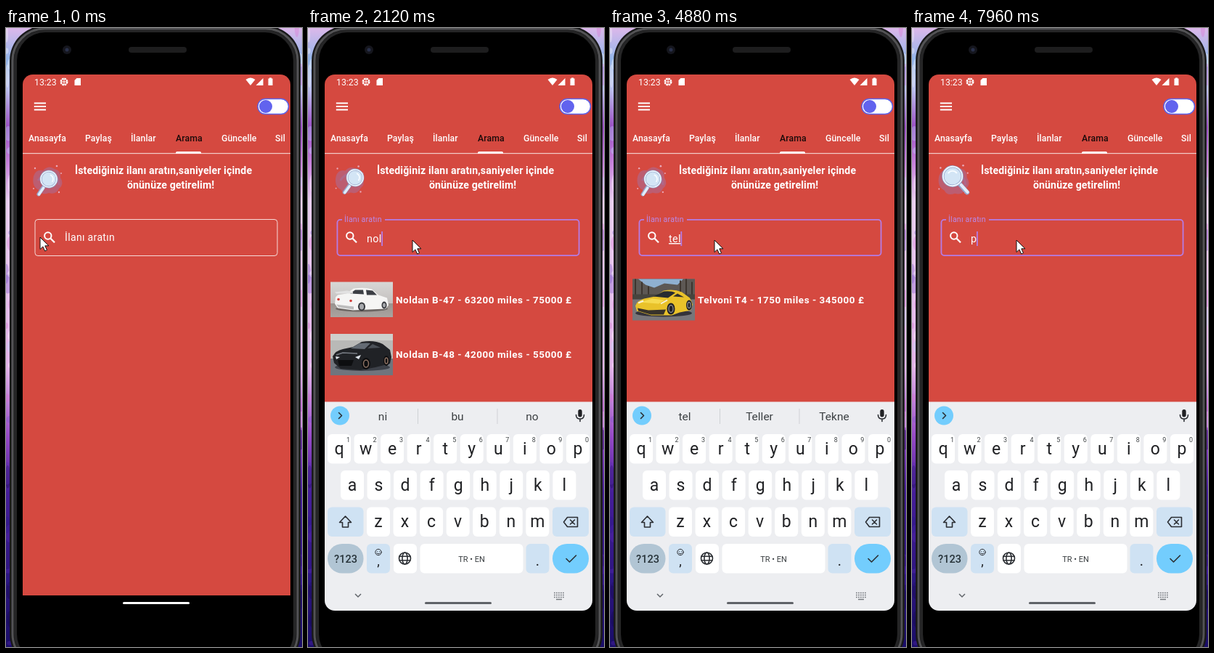
An HTML page that plays this animation: 408x852 px, repeating every 8 s.

```html
<!DOCTYPE html>
<html lang="tr">
<head>
<meta charset="utf-8">
<title>Arama</title>
<style>
html, body { margin: 0; width: 100%; height: 100%; overflow: hidden; background: #000; }
svg { display: block; width: 408px; height: 852px; font-family: Roboto, sans-serif; }
.tab { font-size: 12.25px; font-weight: 500; letter-spacing: .09px; fill: #fff; }
.title { font-size: 14.1px; font-weight: 700; letter-spacing: .12px; fill: #fff; }
.row { font-size: 13.5px; font-weight: 700; letter-spacing: .5px; fill: #fff; }
.key { font-size: 23px; fill: #202124; text-anchor: middle; }
.digit { font-size: 9px; fill: #3c4043; text-anchor: middle; }
.word { font-size: 15.5px; fill: #3c4043; text-anchor: middle; }
.line { fill: none; stroke: #2b2e33; stroke-width: 1.6; stroke-linecap: round; stroke-linejoin: round; }
</style>
</head>
<body>
<svg viewBox="0 0 408 852">
  <defs>
    <linearGradient id="paint" x2="0" y2="1">
      <stop offset="0" stop-color="#dcb8ea"/><stop offset=".05" stop-color="#94b6ea"/>
      <stop offset=".1" stop-color="#bcc0ee"/><stop offset=".16" stop-color="#9a50c4"/>
      <stop offset=".22" stop-color="#c884dc"/><stop offset=".28" stop-color="#ead0f0"/>
      <stop offset=".55" stop-color="#e3b4e9"/><stop offset=".66" stop-color="#964ac6"/>
      <stop offset=".75" stop-color="#451e9a"/><stop offset="1" stop-color="#190d68"/>
    </linearGradient>
    <linearGradient id="studio" x2="0" y2="1">
      <stop offset="0" stop-color="#d8d7d6"/><stop offset=".6" stop-color="#c3c0be"/>
      <stop offset=".62" stop-color="#99938f"/><stop offset="1" stop-color="#aaa4a0"/>
    </linearGradient>
    <clipPath id="screen"><rect x="23" y="64" width="369" height="738" rx="14"/></clipPath>
    <clipPath id="box"><rect x="40" y="263" width="335" height="51" rx="4"/></clipPath>
  </defs>

  <rect width="408" height="852" fill="url(#paint)"/>
  <g id="strokes"></g>
  <rect x="5" y="-3" width="401" height="885" rx="48" fill="#19191a"/>
  <rect x="9" y="1" width="393" height="877" rx="44" fill="none" stroke="#535355" stroke-width="3"/>
  <rect x="11" y="3" width="389" height="873" rx="42" fill="#252526"/>
  <rect x="15" y="6" width="381" height="867" rx="39" fill="#000"/>
  <circle cx="84" cy="30" r="6" fill="#15161d"/><circle cx="84" cy="30" r="2.5" fill="#29304a"/>
  <rect x="169" y="26" width="80" height="8" rx="4" fill="#1d1d1e"/>

  <g clip-path="url(#screen)">
    <rect x="23" y="64" width="369" height="717" fill="#d54940"/>
    <g fill="#fff">
      <text x="39" y="78.5" font-size="12.3">13:23</text>
      <circle cx="80" cy="74" r="4.6" fill="none" stroke="#fff" stroke-width="1.8" stroke-dasharray="2.6 1"/>
      <circle cx="80" cy="74" r="3.8" fill="none" stroke="#fff"/>
      <path d="M80 70v8M76 74h8" stroke="#fff"/>
      <path d="M97.5 69h5.5v10h-8.500v-7z"/>
      <path d="M330.500 71q6.500-5 13 0l-6.500 8z"/>
      <path d="M354.500 69v10h-10z"/>
      <path d="M363 68.500h3v1h1.500v9.500h-6v-9.500h1.500z"/>
      <path d="M38.800 102.600h16.200v1.800h-16.200zM38.800 107.100h16.200v1.800h-16.200zM38.800 111.600h16.200v1.800h-16.200z"/>
    </g>
    <rect x="347" y="97.500" width="42.500" height="21" rx="10.500" fill="#fff" stroke="#5e62e8" stroke-width="1.500"/>
    <circle cx="358" cy="108" r="9" fill="#6163ee"/>
    <g id="tabs"></g>
    <rect x="23" y="172" width="369" height="1.200" fill="#f3cbc8"/>
    <path d="M234 173v-1q0-2 2-2h31q2 0 2 2v1z" fill="#fff"/>
    <text class="title" x="95" y="201">İstediğiniz ilanı aratın,saniyeler içinde</text>
    <text class="title" x="167" y="220.500">önünüze getirelim!</text>

    <g id="blob">
      <path d="M38 204q3-10 13-8q8-8 16-2q9 2 8 12q6 9-2 15q-4 9-14 6q-10 4-14-4q-10-5-7-19z" fill="#b0688a" opacity=".66"/>
      <path d="M44 210q8-12 18-9q11 4 11 15" fill="none" stroke="#9a78b0" stroke-width="3" opacity=".4"/>
      <g fill="#e9a9b9"><circle cx="40" cy="193" r="1.200"/><circle cx="70" cy="190" r="1.300"/><circle cx="76" cy="200" r="1"/><circle cx="38" cy="221" r="1"/><circle cx="73" cy="226" r="1.200"/></g>
    </g>
    <g id="lens">
      <path d="M12 0H25" stroke="#97a9cd" stroke-width="5.200" stroke-linecap="round"/>
      <path d="M14 -.600H25" stroke="#e2edfb" stroke-width="3.400" stroke-linecap="round"/>
      <circle r="11" fill="#d3e5f5" stroke="#8fa4cb" stroke-width="2.800"/>
      <circle r="11" fill="none" stroke="#edf4fc" stroke-width="1.600"/>
      <path d="M-6 1A6 6 0 0 1 0-6" fill="none" stroke="#f6fbff" stroke-width="1.800" stroke-linecap="round"/>
    </g>

    <g clip-path="url(#box)"><circle id="ripple" cx="144" cy="293" fill="#a8322d"/></g>
    <rect id="border" rx="4" fill="none"/>
    <rect id="gap" x="47" y="260" width="59" height="7" fill="#d54940"/>
    <text id="label">İlanı aratın</text>
    <g fill="none" stroke="#fff" stroke-width="2"><circle cx="57.800" cy="286" r="4.700"/><path d="M61.300 289.500L67 295.300" stroke-width="2.300"/></g>
    <text id="typed" x="81" y="295" font-size="14.300" letter-spacing=".35" fill="#fff"></text>
    <rect id="caret" y="280" width="1.800" height="20" fill="#b47ce6"/>

    <g id="studioCars">
      <g transform="translate(31 349.500)">
        <rect width="86" height="48.500" fill="url(#studio)"/>
        <ellipse cx="43" cy="37" rx="36" ry="4" fill="#6c6663"/>
        <path d="M7 21l3-3 12-2 10-7q16-2 25 1l9 8 12 4 2 10-4 5-45 2-21-3-4-6z" fill="#f5f5f4"/>
        <path d="M27 16l7-5h11l1 6zM49 11l9 1 6 6-14 0z" fill="#3b3e44"/>
        <path d="M6 14l17-2 8 2v2H8z" fill="#e2e2e2"/>
        <path d="M8 31l24 3v4l-21-3z" fill="#bdbdbd"/>
        <g fill="#d2423c"><circle cx="11" cy="24" r="1.800"/><circle cx="28" cy="26" r="1.800"/></g>
        <g fill="#36383c"><ellipse cx="43" cy="34" rx="5" ry="6"/><ellipse cx="74" cy="32" rx="3.500" ry="5"/></g>
        <g fill="#a7a9ad"><ellipse cx="43" cy="34" rx="3" ry="4"/><ellipse cx="74" cy="32" rx="2" ry="3"/></g>
      </g>
      <g transform="translate(31 421)">
        <rect width="86" height="57" fill="#b9b9b7"/>
        <rect y="34" width="86" height="23" fill="#70757d"/>
        <path d="M0 0h86v9H0z" fill="#cfcfcc"/>
        <ellipse cx="44" cy="46" rx="38" ry="5" fill="#3d4149"/>
        <path d="M3 31q4-8 14-10l14-3 12-7q17-3 29 3l10 8 2 10-2 9-20 5-21 4-27-2-9-8z" fill="#202226"/>
        <path d="M28 20l12-7q11-1 15 0l-8 8z" fill="#646b74"/><path d="M51 20l7-6 11 5z" fill="#4b5057"/>
        <path d="M8 29l9-3 20 1" fill="none" stroke="#777c84" stroke-width="1.500"/>
        <path d="M10 36h22l-3 8H12z" fill="#0d0e10"/>
        <path d="M7 31l6 1-5 3zM34 32l8-3-3 6z" fill="#dde3ea"/>
        <g fill="#0c0d0f"><ellipse cx="49" cy="41" rx="6" ry="8"/><ellipse cx="77" cy="37" rx="4" ry="7"/></g>
        <g fill="none" stroke="#8d7263" stroke-width="1.500"><ellipse cx="49" cy="41" rx="3.500" ry="5"/><ellipse cx="77" cy="37" rx="2" ry="4"/></g>
      </g>
      <text class="row" x="121" y="378.500">Noldan B-47 - 63200 miles - 75000 £</text>
      <text class="row" x="121" y="453.500">Noldan B-48 - 42000 miles - 55000 £</text>
    </g>
    <g id="roadCar">
      <g transform="translate(31 345.500)">
        <rect width="86" height="57" fill="#77767a"/>
        <path d="M0 0h86v24H0z" fill="#5d5854"/>
        <path d="M8 0h62l-8 8-18-2-14 6-12-4z" fill="#8fb0d0"/>
        <path d="M4 0v25M13 4v20M22 10v14M66 2v22M74 0v24M82 4v22" stroke="#3d352f" stroke-width="2"/>
        <path d="M0 21h86v7H0z" fill="#46443e"/>
        <ellipse cx="43" cy="47" rx="39" ry="5" fill="#34333a"/>
        <path d="M4 37q2-7 12-10l15-3 12-8q14-3 25 2l11 8 4 9-3 8-15 3-11 4-28 0-20-6z" fill="#e9c22a"/>
        <path d="M29 24l14-7q11-1 16 2l-10 7z" fill="#272b31"/><path d="M56 24l6-4 9 5z" fill="#31302c"/>
        <path d="M10 32l17-5 17 2-8 5z" fill="#f6da50"/>
        <path d="M7 40l15 3 24-1-3 7H25l-17-5z" fill="#37322a"/>
        <path d="M8 33l7-3M39 34l9-5" stroke="#f6f2dc" stroke-width="2"/>
        <g fill="#202126"><ellipse cx="53" cy="41" rx="5.500" ry="8"/><ellipse cx="78" cy="36" rx="4" ry="7"/></g>
        <g fill="none" stroke="#888a90" stroke-width="1.300"><ellipse cx="53" cy="41" rx="3" ry="5"/><ellipse cx="78" cy="36" rx="2" ry="4"/></g>
      </g>
      <text class="row" x="121" y="378.500">Telvoni T4 - 1750 miles - 345000 £</text>
    </g>

    <rect x="23" y="781" width="369" height="21" fill="#000"/>
    <g id="keyboard">
      <rect x="23" y="514.500" width="369" height="300" fill="#edeef1"/>
      <circle cx="44" cy="533.500" r="13" fill="#73cdfd"/>
      <path id="arrow" class="line"/>
      <g id="toolbar" class="line">
        <path d="M87.500 527h13v9l-4.500 4.500h-8.500zM96 540.500v-4.500h4.500M91 531v.500M97 531v.500M91 535q3 2.500 6 0"/>
        <text x="148" y="538.500" font-size="12" font-weight="900" fill="#2b2e33" stroke="none" text-anchor="middle" letter-spacing=".4">GIF</text>
        <path d="M195.500 528h11.500v13h-11.500zM199 528v-2h4.500v2M198.500 532.500h5.500M198.500 535.500h5.500M198.500 538.200h3.500"/>
        <circle cx="255" cy="534" r="4.500" stroke-width="3.800"/>
        <circle cx="255" cy="534" r="6.700" stroke-width="2.400" stroke-dasharray="2.800 4.217" stroke-linecap="butt"/>
        <path d="M287.500 524v20" stroke="#d3d5d9" stroke-width="1"/>
        <path d="M315 534h.1M320 534h.1M325 534h.1" stroke-width="2.800"/>
      </g>
      <g id="words">
        <path d="M151.500 524v21M261 524v21" stroke="#cfd1d5"/>
        <text class="word" x="103" y="540"></text><text class="word" x="206" y="540"></text><text class="word" x="309" y="540"></text>
      </g>
      <rect x="372.300" y="525" width="5.400" height="10.500" rx="2.700" fill="#202124"/>
      <path class="line" d="M369.500 532.500q0 5.500 5.500 5.500t5.500-5.500M375 538v3.500"/>
      <g id="keys"></g>
      <path class="line" d="M51.500 672l-8 8.500h4v6.500h8v-6.500h4z"/>
      <path class="line" d="M357.500 673.500h14v13h-14l-5-6.500zM361.500 677l6 6M367.500 677l-6 6"/>
      <text x="52" y="735.500" font-size="14.500" font-weight="500" fill="#263238" text-anchor="middle">?123</text>
      <g class="line">
        <circle cx="97" cy="721.500" r="4.200" stroke-width="1"/><path d="M95.400 720.500v.1M98.600 720.500v.1M94.800 723q2.200 2 4.400 0" stroke-width="1"/>
        <circle cx="133.500" cy="730" r="8"/><ellipse cx="133.500" cy="730" rx="3.600" ry="8"/><path d="M126 727.300h15M126 732.700h15"/>
        <path d="M356 730.500l4.500 4.500 9-9"/>
      </g>
      <text class="key" x="97" y="740" style="font-size:18px">,</text>
      <text class="key" x="316.500" y="740" style="font-size:20px">.</text>
      <text x="225.500" y="734.500" font-size="11" fill="#3c4043" text-anchor="middle">TR • EN</text>
    </g>
    <g id="nav">
      <path d="M65 779l4 4 4-4" fill="none" stroke="#62666b" stroke-width="1.500"/>
      <path d="M339 777.500h14M339 780.500h14M339 783.500h14" stroke="#777b80" stroke-width="1.700" stroke-dasharray="1.800 1.200"/>
      <path d="M342 786.500h8" stroke="#777b80" stroke-width="1.300"/>
    </g>
    <rect id="home" x="161" y="790" width="92" height="3" rx="1.500"/>
  </g>
  <path id="mouse" d="M0 0v16.500l3.900-3.600 2.700 6.100 2.900-1.300-2.700-5.900h5.200z" fill="#fff" stroke="#111" stroke-width="1" stroke-linejoin="round"/>
</svg>
<script>
const LOOP = 8000, FOCUS = 960, RISE = 1000;
const $ = id => document.getElementById(id);
const set = (el, attrs) => { for (const k in attrs) el.setAttribute(k, attrs[k]); };
const add = (parent, tag, attrs, text) => {
  const el = document.createElementNS('http://www.w3.org/2000/svg', tag);
  set(el, attrs);
  if (text) el.textContent = text;
  parent.append(el);
};
const clamp = v => Math.max(0, Math.min(1, v));
const mix = (a, b, p) => a + (b - a) * p;
const smooth = p => p * p * (3 - 2 * p);
const show = (el, on) => { el.style.display = on ? '' : 'none'; };

// Painted wallpaper behind the phone
let seed = 7;
const random = () => (seed = seed * 16807 % 2147483647) / 2147483647;
for (let i = 0; i < 70; i++) {
  const y = random() * 852, left = random() < .6;
  const tints = y < 560 ? ['#fff', '#b9d8f5', '#d86fd0', '#7b55c8'] : ['#5b2cb4', '#2a1a8c', '#120a48'];
  add($('strokes'), 'ellipse', {
    cx: left ? random() * 12 : 398 + random() * 10, cy: y, rx: 2 + random() * 5, ry: 3 + random() * 13,
    fill: tints[Math.floor(random() * tints.length)], opacity: .35
  });
}

[['Anasayfa', 31], ['Paylaş', 109], ['İlanlar', 172], ['Arama', 234], ['Güncelle', 297], ['Sil', 371]]
  .forEach(([name, x]) => add($('tabs'), 'text',
    { class: 'tab', x, y: 156, style: name === 'Arama' ? 'fill:#1c0b0a' : '' }, name));

const key = (x, y, width, fill = '#fff', rx = 6) =>
  add($('keys'), 'rect', { x, y, width, height: 40.5, rx, fill });
[['qwertyuiop', 27, 559], ['asdfghjkl', 45, 609], ['zxcvbnm', 81, 659.5]].forEach(([letters, left, y], row) =>
  [...letters].forEach((letter, i) => {
    const x = left + i * 36.55;
    key(x, y, 32);
    add($('keys'), 'text', { class: 'key', x: x + 16, y: y + 27.5 }, letter);
    if (!row) add($('keys'), 'text', { class: 'digit', x: x + 28.5, y: y + 11 }, String((i + 1) % 10));
  }));
key(27, 659.5, 49.5, '#cfe2f3');
key(337, 659.5, 50, '#cfe2f3');
key(27, 710, 49.5, '#b1c5d4', 20);
key(81, 710, 32, '#cfe2f3');
key(118, 710, 32);
key(154.5, 710, 142);
key(300.5, 710, 32, '#cfe2f3');
key(337, 710, 50, '#73cdfd', 20);

const edits = [
  [FOCUS, ''], [1680, 'n'], [1840, 'no'], [2040, 'nol'],
  [3560, 'no'], [3720, 'n'], [3880, ''],
  [4280, 't'], [4480, 'te'], [4720, 'tel'], [5080, 'telv'],
  [6160, 'tel'], [6320, 'te'], [6480, 't'], [6640, ''], [7880, 'p']
];
const suggestions = {
  n: ['ne', 'bu', 'no'], no: ['ni', 'bu', 'no'], nol: ['nol', 'Nohut', 'nor'],
  t: ['te', 've', 'bu'], te: ['te', 'tek', 'ten'],
  tel: ['tel', 'Teller', 'Tekne'], telv: ['telv', 'Telvoni', 'Telefon']
};
const editAt = t => edits.filter(e => e[0] <= t).pop() || edits[0];

// time, x, y, handle angle, scale
const swing = [
  [0, 59, 208, 124, 1], [600, 63, 211, 126, 1], [1220, 60.5, 216, 128, 1],
  [2120, 65, 206, 126, 1], [3000, 56, 204, 48, 1.2], [3640, 57, 204, 49, 1.25], [4960, 59, 208, 124, 1]
];
function drawLens(t) {
  t %= 4960;
  const i = swing.findIndex(s => s[0] > t), a = swing[i - 1], b = swing[i];
  const p = smooth((t - a[0]) / (b[0] - a[0]));
  const [, x, y, angle, scale] = a.map((v, k) => mix(v, b[k], p));
  set($('lens'), { transform: `translate(${x} ${y}) rotate(${angle}) scale(${scale})` });
  const pulse = 1 + .04 * Math.sin(t / 4960 * Math.PI * 4);
  set($('blob'), { transform: `translate(57 209) scale(${pulse}) translate(-57 -209)` });
}

function drawField(t) {
  const focused = t >= FOCUS, p = smooth(clamp((t - FOCUS) / 167));
  const [since, text] = editAt(t);
  const weight = focused ? 1.8 : 1;
  set($('border'), {
    x: 40 + weight / 2 - .5, y: 263 + weight / 2, width: 335 - weight, height: 51 - weight,
    stroke: focused ? '#b47ce6' : '#f6dbd9', 'stroke-width': weight
  });
  show($('gap'), p > .5);
  set($('label'), {
    x: mix(81, 50, p), y: mix(293, 267, p), 'font-size': mix(14, 10.5, p),
    'letter-spacing': mix(.35, .25, p), fill: focused ? '#b98aec' : '#fff'
  });
  const typed = $('typed');
  typed.textContent = text;
  typed.style.textDecoration = text[0] === 't' ? 'underline' : 'none';
  set($('caret'), { x: 80.6 + (text ? typed.getComputedTextLength() : 0) });
  show($('caret'), focused && (t - since) % 1000 < 500);
  set($('ripple'), { r: mix(8, 70, clamp((t - 900) / 300)), opacity: t < 900 ? 0 : .22 * clamp((1210 - t) / 250) });
  show($('studioCars'), text[0] === 'n');
  show($('roadCar'), text[0] === 't');
}

function drawKeyboard(t) {
  const left = 1 - clamp((t - RISE) / 240), shown = t >= RISE;
  const text = editAt(t)[1], words = suggestions[editAt(t - 120)[1]];
  set($('keyboard'), { transform: `translate(0 ${287 * left * left})` });
  show($('keyboard'), shown);
  show($('nav'), shown && left < .15);
  set($('home'), { fill: !shown ? '#fff' : left < .15 ? '#606368' : '#dcdde1' });
  show($('toolbar'), !text);
  set($('arrow'), { d: text ? 'M42.500 529.500l4 4-4 4' : 'M45.500 529.500l-4 4 4 4' });
  show($('words'), text && words);
  if (words) $('words').querySelectorAll('text').forEach((el, i) => { el.textContent = words[i]; });
}

function draw(t) {
  const p = smooth(clamp((t - 200) / 560));
  set($('mouse'), { transform: `translate(${mix(47, 144, p)} ${mix(288, 292, p)})` });
  drawLens(t);
  drawField(t);
  drawKeyboard(t);
}

const start = performance.now();
function tick() {
  draw((performance.now() - start) % LOOP);
  requestAnimationFrame(tick);
}
tick();
</script>
</body>
</html>
```
